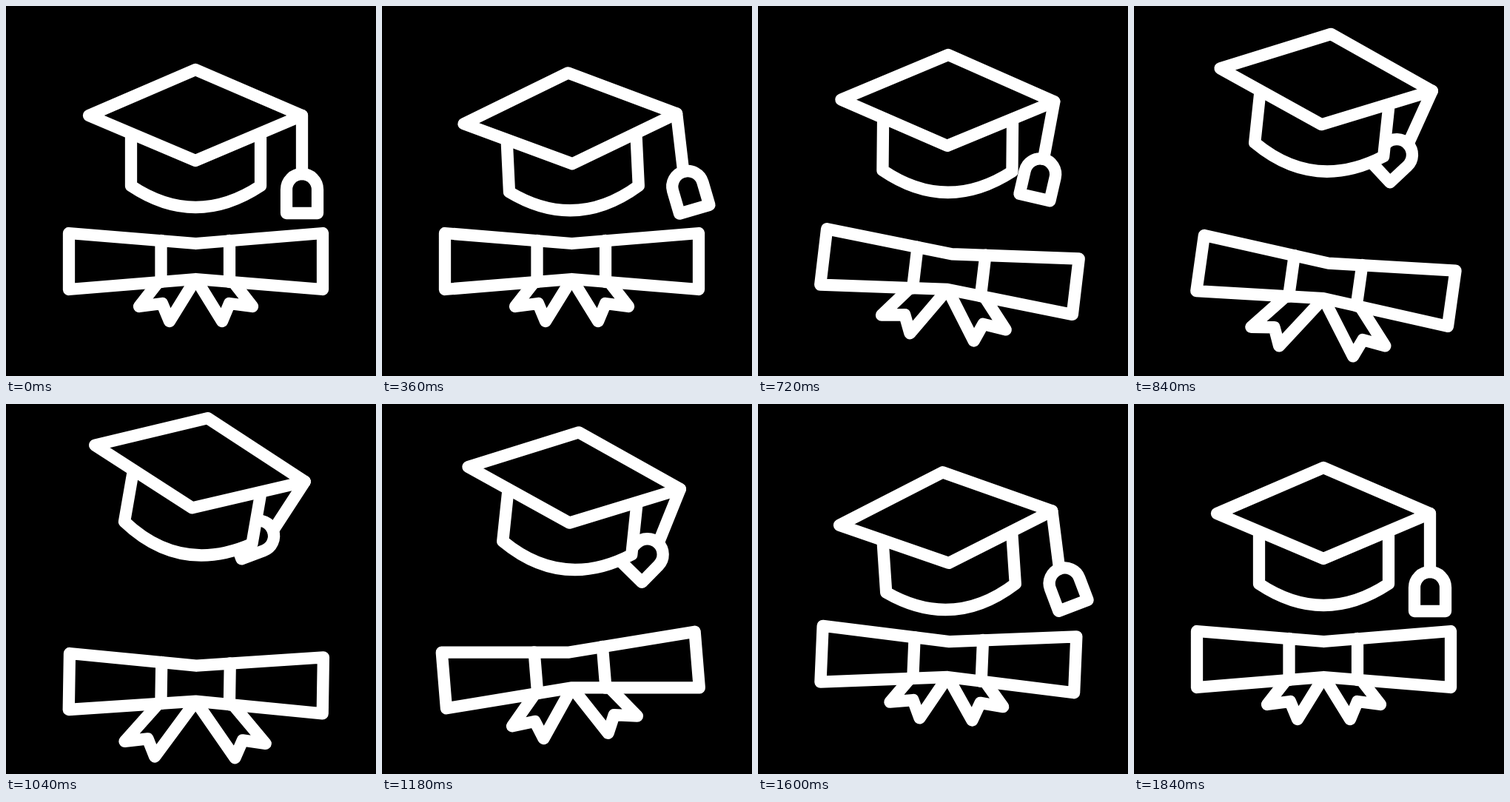
Write an HTML page that moves like this. It is 500x500 px and loops after 2 s.

```html
<!DOCTYPE html>
<html lang="en">
<head>
<meta charset="utf-8">
<title>Graduation</title>
<style>
  html, body { margin: 0; width: 100%; height: 100%; overflow: hidden; background: #000; }
  svg { display: block; width: 100vw; height: 100vh; }
</style>
</head>
<body>
<svg viewBox="0 0 500 500" fill="#000" stroke="#fff" stroke-width="16.3" stroke-linecap="round" stroke-linejoin="round">
  <g id="diploma">
    <path id="ribbonLeft" fill="none"/>
    <path id="ribbonRight" fill="none"/>
    <path d="M85 307 256.500 321 428 307V383L256.500 369 85 383Z"/>
    <path d="M209.500 317V373M302 317V373"/>
  </g>
  <g id="cap">
    <g id="tassel">
      <path d="M400 148V227"/>
      <path id="tag" fill="none" d="M379 280V248A21 21 0 0 1 421 248V280Z"/>
    </g>
    <path d="M169 178V243Q256 301 344 243V178"/>
    <path d="M256 86 400 148 256 209 112 148Z"/>
  </g>
</svg>
<script>
const LOOP = 2000, BEGIN = 170, DIP = 520, PEAK = 1010, LAND = 1500, END = 1840;
const el = id => document.getElementById(id);

// Sine ease from 0 to 1 between two times.
function ease(t, from, to) {
  const p = Math.min(1, Math.max(0, (t - from) / (to - from)));
  return (1 - Math.cos(Math.PI * p)) / 2;
}

// Wind up to low, jump to high, fall back to low and settle at zero.
function jump(t, low, high, dip = DIP) {
  return low * (ease(t, BEGIN, dip) - ease(t, LAND, END))
    + (high - low) * (ease(t, dip, PEAK) - ease(t, PEAK, LAND));
}

function place(id, turn, x, y, dy = 0) {
  el(id).setAttribute('transform', `translate(0 ${dy}) rotate(${turn} ${x} ${y})`);
}

function drawRibbon(id, side, stretch) {
  const point = (x, y, s = 0) => `${256.5 + side * (x + s)} ${y + s}`;
  el(id).setAttribute('d', 'M' + [
    point(53, 376), point(76.5, 406, stretch), point(45.5, 402, stretch),
    point(35.5, 426, stretch), point(1.5, 371)
  ].join('L'));
}

function draw(t) {
  const capTurn = jump(t, -4.8, 10);
  place('cap', capTurn, 256, 183, jump(t, 7.5, -69));
  place('tassel', jump(t, -9, 33.5, DIP - 60) - capTurn, 400, 148);
  place('tag', jump(t, -17, 37), 400, 227);

  const drop = 34 * (ease(t, 500, 1000) - ease(t, 1000, 1330));
  const rock = 8 * ease(t, 380, 840) - 13 * ease(t, 840, 1220)
    + 9 * ease(t, 1220, 1420) - 4 * ease(t, 1420, END);
  place('diploma', rock, 256.5, 366, drop);
  drawRibbon('ribbonLeft', -1, drop * 0.57);
  drawRibbon('ribbonRight', 1, drop * 0.57);
}

const start = performance.now();
function tick() {
  draw((performance.now() - start) % LOOP);
  requestAnimationFrame(tick);
}
tick();
</script>
</body>
</html>
```
